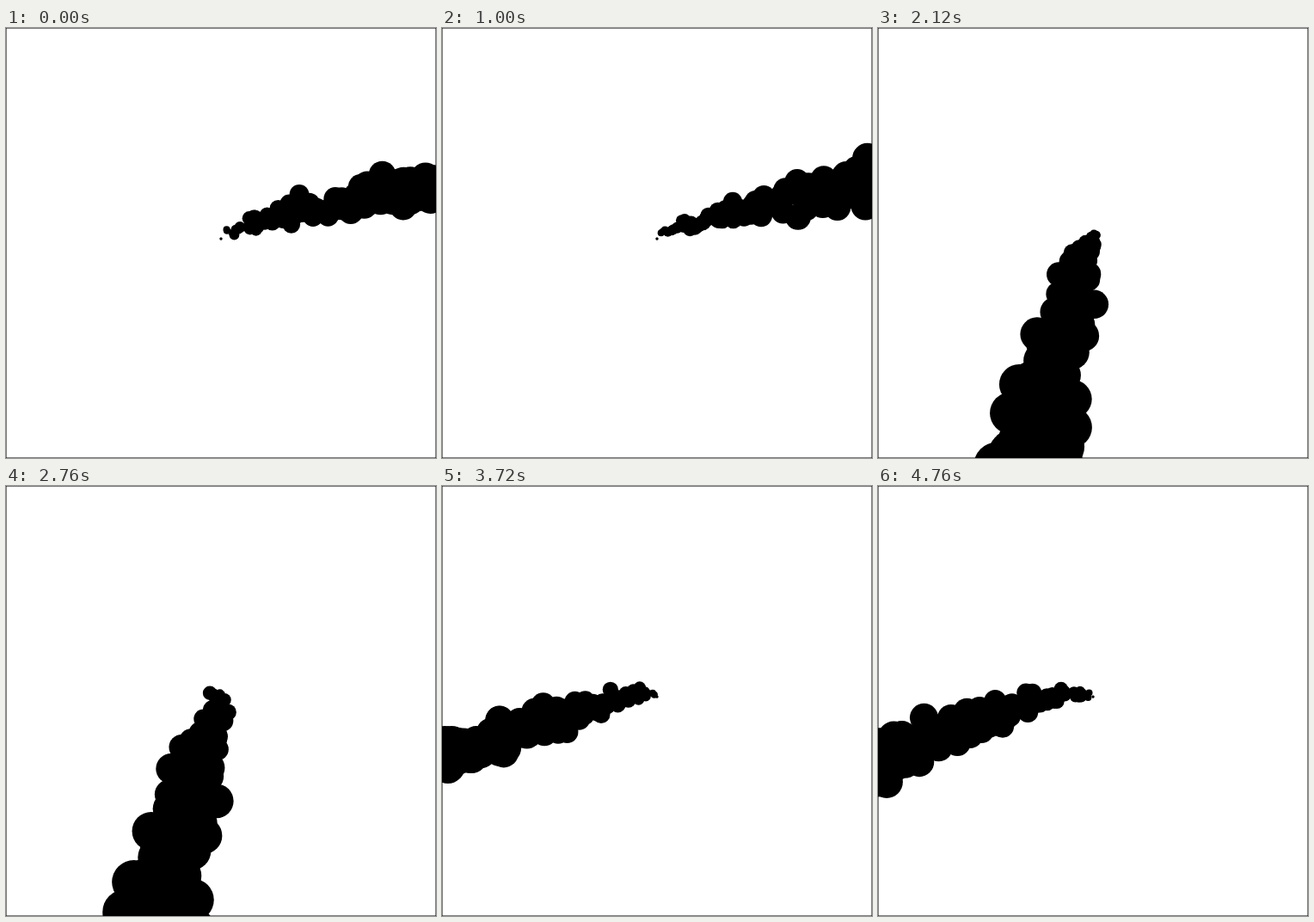
Animation, 500 px wide and 500 px high, one loop 4.8 s. Source, as an HTML page with a canvas:

```html
<!DOCTYPE html>
<html>
<head>
<meta charset="utf-8">
<title>Smoke in changing wind</title>
<style>
  html, body { margin: 0; height: 100%; overflow: hidden; background: #fff; }
  canvas { display: block; }
</style>
</head>
<body>
<canvas id="stage" width="500" height="500"></canvas>
<script>
const ctx = document.getElementById('stage').getContext('2d');
const STEP = 40;            // ms per step
const STREAM_STEPS = 40;    // steps until the wind changes
const HISTORY = 140;        // steps of smoke already in the air
const PUFFS_PER_STEP = 2;
const SPREAD = 1.8, LIFT = 6;
const ORIGIN = { x: 250, y: 245 };

const winds = [
  { x: 6.2, y: -0.6 },
  { x: -0.78, y: 3.4 },
  { x: -5.2, y: 2.35 }
];

let seed = 11;
function random() {
  seed = (seed * 1664525 + 1013904223) % 4294967296;
  return seed / 4294967296;
}

// Roughly normal, with unit deviation.
const bell = () => (random() + random() + random() + random() - 2) * Math.sqrt(3);

function makePuffs() {
  const puffs = [];
  for (let birth = -HISTORY; birth < STREAM_STEPS; birth++)
    for (let i = 0; i < PUFFS_PER_STEP; i++)
      puffs.push({ birth, dx: bell() * SPREAD, dy: bell() * SPREAD - LIFT });
  return puffs;
}

const streams = winds.map(wind => ({ wind, puffs: makePuffs() }));

// A puff rides the wind; its size, lift and sideways drift grow with the root of its age.
function drawPuff({ birth, dx, dy }, wind, step) {
  const age = step - birth;
  if (age < 0) return;
  const root = Math.sqrt(age);
  ctx.beginPath();
  ctx.arc(ORIGIN.x + wind.x * age + dx * root,
          ORIGIN.y + wind.y * age + dy * root,
          1.5 + 2.55 * root, 0, Math.PI * 2);
  ctx.fill();
}

function draw(time) {
  const step = Math.floor(time / STEP) % (STREAM_STEPS * streams.length);
  const { wind, puffs } = streams[Math.floor(step / STREAM_STEPS)];
  ctx.fillStyle = '#fff';
  ctx.fillRect(0, 0, 500, 500);
  ctx.fillStyle = '#000';
  for (const puff of puffs) drawPuff(puff, wind, step % STREAM_STEPS);
  ctx.strokeRect(0, 0, 500, 500);
}

const start = performance.now();
function tick() {
  draw(performance.now() - start);
  requestAnimationFrame(tick);
}
tick();
</script>
</body>
</html>
```
